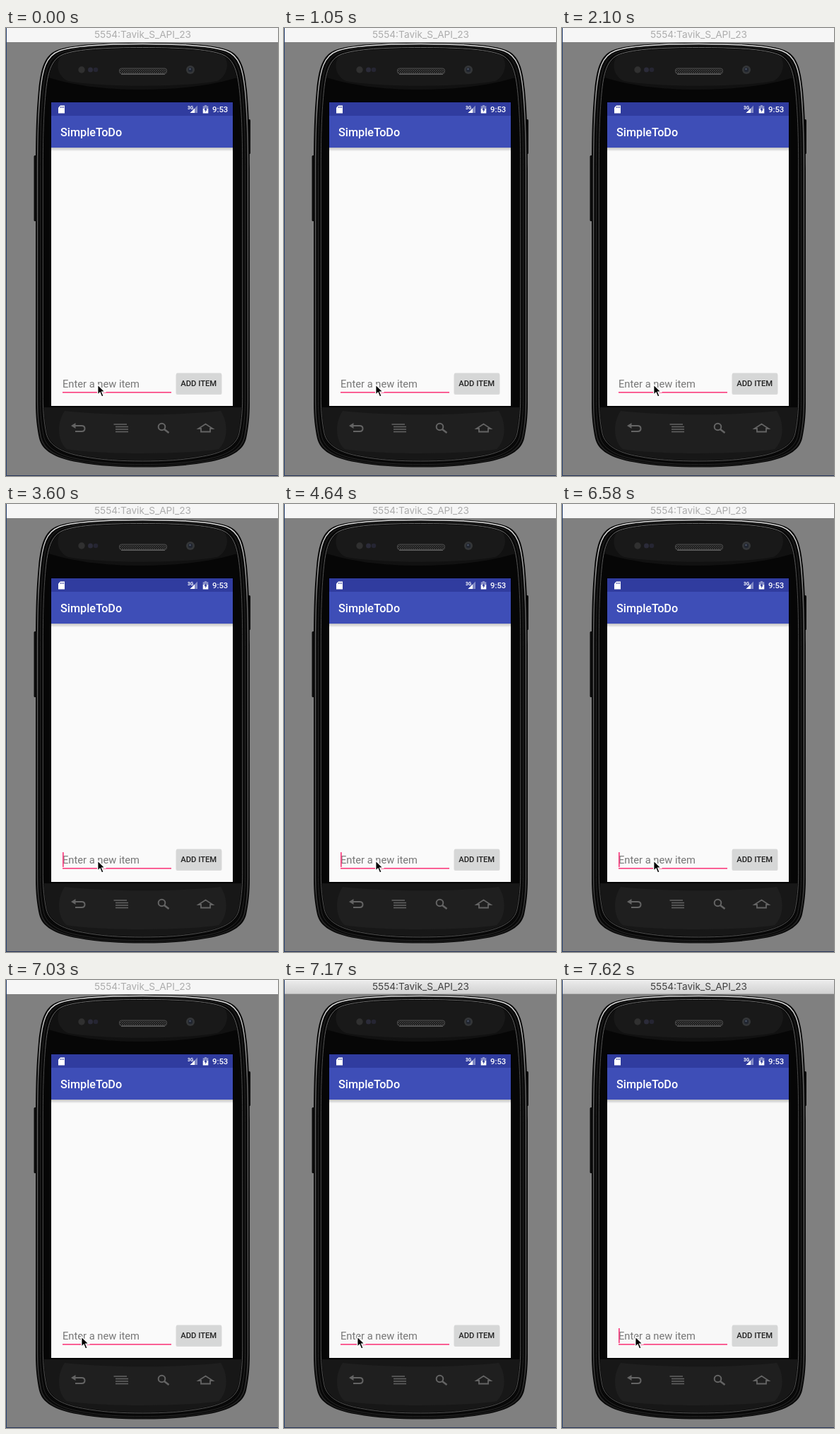
Animation, 385 px wide and 633 px high, one loop 8000 ms. Source, as an HTML page:

```html
<!DOCTYPE html>
<html lang="en">
<head>
<meta charset="utf-8">
<title>Emulator</title>
<style>
  html, body { margin: 0; width: 385px; height: 633px; overflow: hidden; background: #808080; }
  svg { display: block; }
  text { font-family: Roboto, sans-serif; }
  .medium { font-weight: 500; }
  .title { font: 13.7px Inter, sans-serif; text-anchor: middle; }
  .rim { fill: none; vector-effect: non-scaling-stroke; }
  .nav { fill: none; stroke: #646464; stroke-width: 2; }

  .caret, .pointer, .focused { animation: 8s step-end infinite; }
  .caret { animation-name: blink; }
  .pointer { animation-name: point; }
  .focused { animation-name: focus; }

  @keyframes blink {
    0%, 13.125%, 26.25%, 37.5%, 50.625%, 63.625%, 76.75%, 87.875% { opacity: 0; }
    7.5%, 18.75%, 31.875%, 45%, 58%, 69.25%, 82.25%, 95.25% { opacity: 1; }
    100% { opacity: 1; }
  }
  @keyframes point {
    0% { transform: translate(129px, 503px); }
    86% { transform: translate(119px, 503px); }
    87.875% { transform: translate(106px, 503px); }
    89.625%, 100% { transform: translate(103px, 503px); }
  }
  @keyframes focus {
    0% { opacity: 0; }
    89.625%, 100% { opacity: 1; }
  }
</style>
</head>
<body>
<svg width="385" height="633" viewBox="0 0 385 633">
  <defs>
    <path id="body" d="M193.500 21C246 21 292 23 314 31C333 38 338 58 341 88C344 120 345 150 345 200V530C345 550 343 566 340 580C336 597 318 608 285 613.500C255 619 225 620.500 193.500 620.500C162 620.500 132 619 102 613.500C69 608 51 597 47 580C44 566 42 550 42 530V200C42 150 43 120 46 88C49 58 54 38 73 31C95 23 141 21 193.500 21Z"/>
    <clipPath id="face">
      <use href="#body" transform="translate(193.500 320) scale(.925 .972) translate(-193.500 -321)"/>
    </clipPath>
    <linearGradient id="edge" x2="0" y2="1">
      <stop offset="0" stop-color="#e4e4e4"/>
      <stop offset=".07" stop-color="#bdbdbd"/>
      <stop offset=".2" stop-color="#626262"/>
      <stop offset=".85" stop-color="#484848"/>
      <stop offset="1" stop-color="#161616"/>
    </linearGradient>
    <linearGradient id="line" x2="0" y2="1">
      <stop offset="0" stop-color="#747474"/>
      <stop offset=".15" stop-color="#4a4a4a"/>
      <stop offset="1" stop-color="#555"/>
    </linearGradient>
    <linearGradient id="bar" x2="0" y2="1">
      <stop offset="0" stop-color="#ebebeb"/>
      <stop offset="1" stop-color="#d0d0d0"/>
    </linearGradient>
    <linearGradient id="shade" x2="0" y2="1">
      <stop offset="0" stop-color="#000" stop-opacity=".22"/>
      <stop offset="1" stop-color="#000" stop-opacity="0"/>
    </linearGradient>
    <pattern id="mesh" width="3" height="3" patternUnits="userSpaceOnUse">
      <rect width="3" height="3" fill="#161616"/>
      <path d="M0 3L3 0M0 0L3 3" stroke="#484848" stroke-width=".7"/>
    </pattern>
  </defs>

  <!-- window -->
  <rect width="385" height="633" fill="#808080"/>
  <rect y="632" width="385" height="1" fill="#28375a"/>
  <rect width="385" height="20" fill="#f6f6f6"/>
  <text class="title" x="193.500" y="14" fill="#adadad">5554:Tavik_S_API_23</text>
  <g class="focused">
    <rect y="1" width="385" height="19" fill="url(#bar)"/>
    <rect y="19" width="385" height="1" fill="#b9b9b9"/>
    <text class="title" x="193.500" y="14" fill="#424242">5554:Tavik_S_API_23</text>
  </g>
  <rect width="1" height="633" fill="#26406f"/>

  <!-- phone -->
  <rect x="39.500" y="180" width="6" height="93" rx="1.500" fill="#0b0b0b"/>
  <rect x="341" y="129" width="5" height="49" rx="1.500" fill="#0b0b0b"/>
  <use href="#body" fill="#080808"/>
  <use href="#body" class="rim" stroke="url(#edge)" stroke-width="1.500" transform="translate(193.500 321) scale(.983 .995) translate(-193.500 -321)"/>
  <use href="#body" class="rim" stroke="#292929" transform="translate(193.500 321) scale(.957 .987) translate(-193.500 -321)"/>
  <use href="#body" class="rim" stroke="url(#line)" transform="translate(193.500 320) scale(.932 .975) translate(-193.500 -321)"/>
  <g clip-path="url(#face)">
    <rect x="50" y="20" width="290" height="600" fill="#060606"/>
    <path d="M50 20H340V66C300 80 250 87 193 87S86 80 50 66Z" fill="#111"/>
    <path d="M82 35C135 27 252 27 305 35C319 48 313 68 299 75C248 84 138 84 88 75C72 68 68 48 82 35Z" fill="#191919"/>
    <path d="M50 536H340V620H50Z" fill="#171717"/>
    <path d="M83 541C145 548 242 548 304 541C316 560 313 584 301 595C252 603 135 603 86 595C73 584 71 560 83 541Z" fill="#1f1f1f"/>
  </g>
  <rect x="160.500" y="57" width="67" height="7.500" rx="3" fill="url(#mesh)" stroke="#4b4b4b"/>
  <path d="M163 65.500H225" stroke="#777" stroke-width=".7"/>
  <circle cx="107" cy="59" r="4.700" fill="#303030"/>
  <circle cx="119.500" cy="59" r="3.500" fill="#2b2b39"/>
  <circle cx="127" cy="59" r="3.300" fill="#252532"/>
  <circle cx="261" cy="59" r="6" fill="#343638"/>
  <circle cx="261" cy="59" r="3.200" fill="#20252f"/>
  <circle cx="260.500" cy="58" r="1.300" fill="#4b5464"/>

  <!-- hardware keys -->
  <g class="nav">
    <path d="M96 562H107Q111.500 562 111.500 566T107 570H98"/>
    <path d="M98.500 558L92 562L98.500 566Z" fill="#646464" stroke="none"/>
    <path d="M152.500 560H171M155 563.500H173M155 567H173M155 570.500H173" stroke-width="1.500"/>
    <circle cx="220.500" cy="563.500" r="4.800"/>
    <path d="M224 567L230.500 572" stroke-width="2.600"/>
    <path d="M272.500 566L282.500 559.500L292.500 566H289V570.500H276V566Z" stroke-width="1.800"/>
  </g>

  <!-- app -->
  <rect x="63" y="104" width="259" height="431" fill="#000"/>
  <rect x="64" y="105" width="257" height="429" fill="#fafafa"/>
  <rect class="focused" x="64" y="169" width="257" height="365" fill="#f8f8f8"/>
  <rect x="64" y="169" width="257" height="5.500" fill="url(#shade)"/>
  <rect x="64" y="105" width="257" height="19" fill="#303c9f"/>
  <rect x="64" y="124" width="257" height="45" fill="#3e4eb7"/>
  <text class="medium" x="77" y="153" font-size="16.200" fill="#fff">SimpleToDo</text>

  <!-- status icons -->
  <g fill="#fff">
    <path d="M77 109.500H83V120.500H74V112.500Z"/>
    <path d="M77.500 111V113M79.500 111V113M81.500 111V113" stroke="#303c9f" stroke-width=".9"/>
    <text x="257" y="114.500" font-size="6.500" font-weight="700">3G</text>
    <path d="M271 109.500V120H260.500Z" opacity=".4"/>
    <path d="M267 113.500V120H260.500Z"/>
    <path d="M281 109H284V110.200H286.300V114H278.700V110.200H281Z" opacity=".45"/>
    <path d="M278.700 114H286.300V120.500H278.700Z"/>
    <path d="M283.200 111.500L280.500 116H282.200V119L284.700 114.500H283.200Z" fill="#303c9f"/>
    <text class="medium" x="292" y="119" font-size="11.300">9:53</text>
  </g>

  <!-- input row -->
  <text x="80" y="508" font-size="14.700" fill="#777">Enter a new item</text>
  <rect x="80" y="514" width="154" height="1.700" fill="#fa4583"/>
  <rect class="caret" x="80" y="492" width="1.700" height="21" fill="#f84181"/>
  <rect x="240.500" y="488.500" width="65" height="29.500" rx="2" fill="#000" opacity=".13"/>
  <rect x="241" y="487.500" width="64" height="29" rx="1.600" fill="#d6d7d7"/>
  <text class="medium" x="272.700" y="506" font-size="11.250" fill="#222" text-anchor="middle">ADD ITEM</text>

  <g class="pointer">
    <path d="M.7.800V15.400L4 12.300L6.500 18.200L9.200 17L6.800 11.300H11.300Z" fill="#000" stroke="#fff" stroke-width="1.400"/>
  </g>
</svg>
</body>
</html>
```
